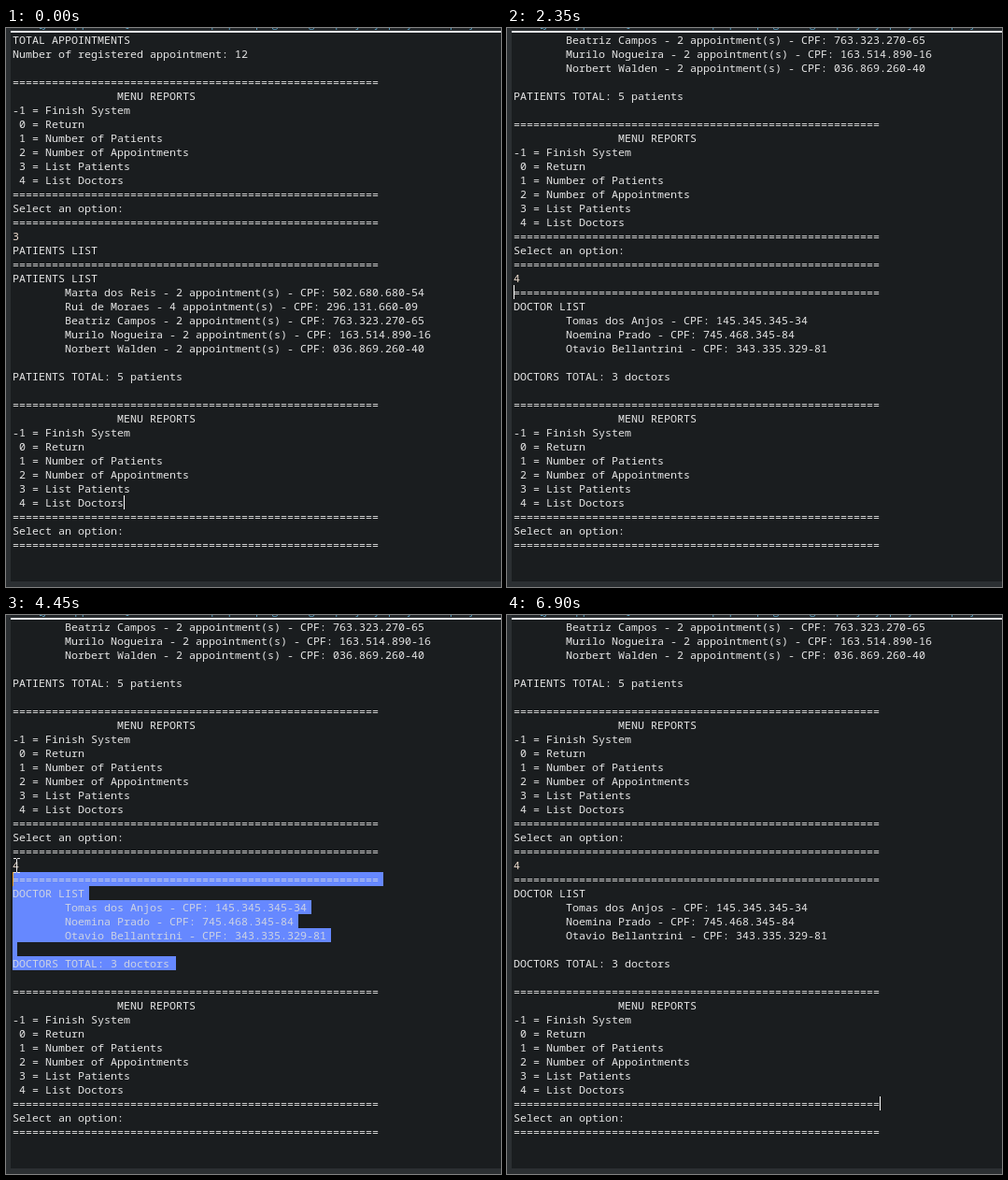
These frames come from a looping animation (530 by 598 pixels, 7 s). An HTML page with a canvas:

```html
<!DOCTYPE html>
<html lang="en">
<head>
<meta charset="utf-8">
<title>Console reports</title>
<style>
  html, body { margin: 0; width: 100%; height: 100%; overflow: hidden; background: #1a1d1f; }
  canvas { display: block; }
</style>
</head>
<body>
<canvas id="stage" width="530" height="598"></canvas>
<script>
const ctx = document.getElementById('stage').getContext('2d');
const LOOP = 7000, LEFT = 7, TOP = 5, CHAR = 7, ROW = 15, SCROLL_ROWS = 20;
const RULE = '='.repeat(56), INDENT = ' '.repeat(8);

const menu = [
  '', RULE, ' '.repeat(16) + 'MENU REPORTS', '-1 = Finish System', ' 0 = Return',
  ' 1 = Number of Patients', ' 2 = Number of Appointments', ' 3 = List Patients',
  ' 4 = List Doctors', RULE, 'Select an option:', RULE
];
const patients = [
  'Marta dos Reis - 2 appointment(s) - CPF: 502.680.680-54',
  'Rui de Moraes - 4 appointment(s) - CPF: 296.131.660-09',
  'Beatriz Campos - 2 appointment(s) - CPF: 763.323.270-65',
  'Murilo Nogueira - 2 appointment(s) - CPF: 163.514.890-16',
  'Norbert Walden - 2 appointment(s) - CPF: 036.869.260-40'
];
const doctors = [
  'Tomas dos Anjos - CPF: 145.345.345-34',
  'Noemina Prado - CPF: 745.468.345-84',
  'Otavio Bellantrini - CPF: 343.335.329-81'
];
const indent = line => INDENT + line;
const before = [
  'TOTAL APPOINTMENTS', 'Number of registered appointment: 12', ...menu,
  '3', 'PATIENTS LIST', RULE, 'PATIENTS LIST', ...patients.map(indent),
  '', 'PATIENTS TOTAL: 5 patients', ...menu
];
const after = [
  ...before, '4', RULE, 'DOCTOR LIST', ...doctors.map(indent),
  '', 'DOCTORS TOTAL: 3 doctors ', ...menu
].slice(SCROLL_ROWS);

// Carets and selection starts are [row, column]; the pointer is [left, top].
const listTop = [18, 0], lineEnd = [34, 56], selectionEnd = [24, 25];
const steps = [
  { at: 0, lines: before, caret: [33, 17] },
  { at: 310, caret: null },
  { at: 1020, lines: [...before, '4'], caret: [37, 1] },
  { at: 1480, caret: null },
  { at: 2040, caret: [37, 1] },
  { at: 2350, lines: after, caret: listTop },
  { at: 2920, caret: null },
  { at: 3370, pointer: [227, 272] },
  { at: 3490, pointer: [208, 260], caret: listTop },
  { at: 3630, pointer: [196, 300] },
  { at: 3780, pointer: [190, 332] },
  { at: 3930, pointer: [192, 379] },
  { at: 4060, pointer: [188, 368], caret: selectionEnd },
  { at: 4180, pointer: [181, 364] },
  { at: 4320, pointer: [84, 327], caret: [22, 15], from: [22, 15] },
  { at: 4450, pointer: [8, 260], caret: listTop, from: listTop },
  { at: 4720, pointer: [30, 365] },
  { at: 4870, pointer: [263, 483] },
  { at: 5020, pointer: null },
  { at: 5170, caret: null },
  { at: 5480, pointer: [492, 518] },
  { at: 5600, caret: lineEnd, from: null },
  { at: 5730, pointer: [514, 578] },
  { at: 5850, pointer: null },
  { at: 6120, caret: null },
  { at: 6900, caret: lineEnd }
];

const stateAt = time => Object.assign({}, ...steps.filter(step => step.at <= time));
const colX = col => LEFT + col * CHAR;
const rowY = row => TOP + row * ROW;

function box(color, x, y, w, h) {
  ctx.fillStyle = color;
  ctx.fillRect(x, y, w, h);
}

function drawFrame() {
  box('#1a1d1f', 0, 0, 530, 598);
  box('#2b2f32', 0, 0, 5, 598);
  box('#2b2f32', 0, 592, 530, 6);
  box('#24282b', 5, 0, 525, 3);
  // Only the descenders of the console title reach the stage.
  ctx.save();
  ctx.beginPath();
  ctx.rect(5, 0, 525, 3);
  ctx.clip();
  ctx.font = '12px "Open Sans", sans-serif';
  ctx.fillStyle = '#5b9fc0';
  ctx.fillText('[Java Application] C:\\Users\\user\\.p2\\pool\\plugins\\org.eclipse.justj.openjdk.hotspot.jre.full', 35, -1);
  ctx.restore();
  box('#e4e6ea', 5, 3, 525, 2);
}

function drawLine(line, row, from) {
  const inRange = from && row >= from[0] && row <= selectionEnd[0];
  const start = !inRange ? Infinity : row === from[0] ? from[1] : 0;
  if (inRange) {
    const lineBreak = row < selectionEnd[0] ? 5 : 0;
    box('#6688ff', colX(start), rowY(row), (line.length - start) * CHAR + lineBreak, ROW);
  }
  const plain = /^\d$/.test(line) ? '#f0dfd0' : '#e6e6e6';
  [...line].forEach((char, col) => {
    ctx.fillStyle = col >= start ? '#cdd3e4' : plain;
    ctx.fillText(char, colX(col), rowY(row) + 12);
  });
}

function drawPointer([x, y]) {
  for (const edge of [y, y + 15]) {
    box('#e6e6e6', x, edge, 3, 1);
    box('#e6e6e6', x + 4, edge, 3, 1);
  }
  box('#e6e6e6', x + 3, y + 1, 1, 14);
}

function draw(time) {
  const { lines, caret, pointer, from } = stateAt(time);
  drawFrame();
  ctx.font = '11.667px "Noto Sans Mono", "DejaVu Sans Mono", monospace';
  lines.forEach((line, row) => drawLine(line, row, from));
  if (caret) box(from ? '#e69a20' : '#ffffff', colX(caret[1]), rowY(caret[0]), 1, ROW);
  if (pointer) drawPointer(pointer);
}

const began = performance.now();
function tick() {
  draw((performance.now() - began) % LOOP);
  requestAnimationFrame(tick);
}
tick();
</script>
</body>
</html>
```
